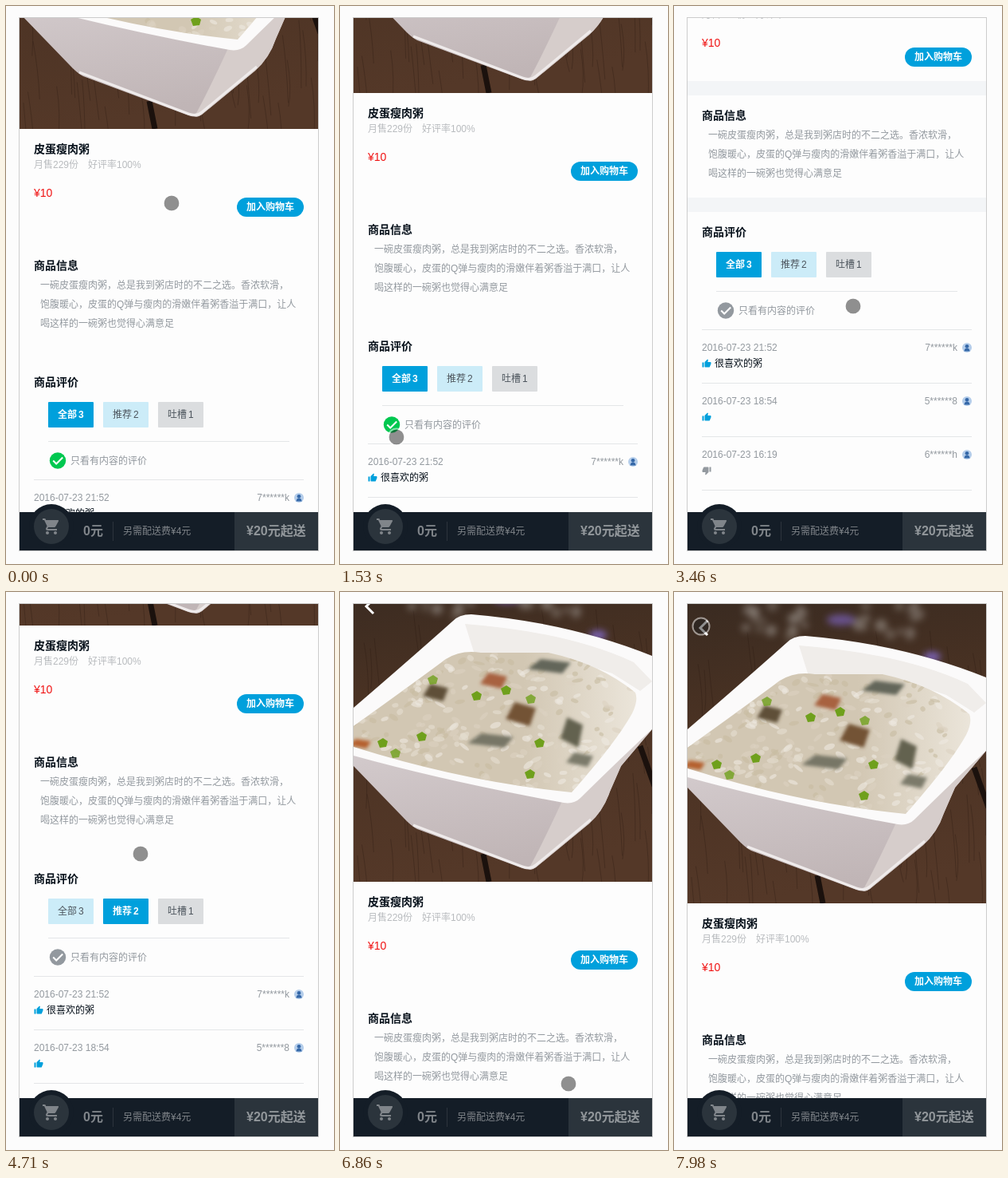
An HTML page for the animation above (8 s loop, 412 by 699 pixels).

```html
<!DOCTYPE html>
<html lang="zh-CN">
<head>
<meta charset="utf-8">
<style>
html, body { margin: 0; width: 100%; height: 100%; overflow: hidden; background: #fcfcfc; }
svg { display: block; font-family: "Liberation Sans", "Noto Sans CJK SC", sans-serif; }
</style>
</head>
<body>
<svg id="stage" width="412" height="699" viewBox="0 0 412 699">
  <defs>
    <clipPath id="screen"><rect x="17" y="15" width="375" height="667"/></clipPath>
    <clipPath id="square"><rect width="375" height="375"/></clipPath>
    <clipPath id="soupEdge"><path id="soupShape" d="M0 180Q70 130 116 96Q135 84 160 88L245 88Q310 102 354 138Q358 148 350 164Q330 200 274 263Q140 250 0 206Z"/></clipPath>
    <linearGradient id="wood" x2=".15" y2="1">
      <stop offset="0" stop-color="#3a2b21"/><stop offset=".4" stop-color="#4a3223"/>
      <stop offset="1" stop-color="#543828"/>
    </linearGradient>
    <linearGradient id="side" x2=".3" y2="1">
      <stop offset="0" stop-color="#d6ced0"/><stop offset="1" stop-color="#c0b5b6"/>
    </linearGradient>
    <linearGradient id="soup">
      <stop offset=".6" stop-color="#d2c7b3"/><stop offset="1" stop-color="#ebe5da"/>
    </linearGradient>
    <filter id="blur"><feGaussianBlur stdDeviation="4"/></filter>
    <filter id="soft"><feGaussianBlur stdDeviation="2"/></filter>
    <path id="thumb" d="M1 21h4V9H1v12zm22-11c0-1.1-.9-2-2-2h-6.31l.95-4.57.03-.32c0-.41-.17-.79-.44-1.06L14.17 1 7.59 7.59C7.22 7.95 7 8.45 7 9v10c0 1.1.9 2 2 2h9c.83 0 1.54-.5 1.84-1.22l3.02-7.05c.09-.23.14-.47.14-.73v-2z"/>
  </defs>
  <rect x="16.5" y="14.5" width="376" height="668" fill="#fdfdfd" stroke="#ccc"/>
  <g clip-path="url(#screen)">
    <g id="page">
      <g transform="translate(17 15)" clip-path="url(#square)">
        <rect width="375" height="375" fill="url(#wood)"/>
        <g id="grain" stroke="#2c1b12" stroke-opacity=".35" fill="none"/>
        <path d="M163 340L170 375M360 205L378 255" stroke="#1b110d" stroke-width="7"/>
        <g filter="url(#blur)">
          <g id="flowers" fill="#8a8078"/>
          <ellipse cx="193" cy="20" rx="18" ry="7" fill="#67518c"/>
          <ellipse cx="307" cy="66" rx="11" ry="6" fill="#7a62b4"/>
        </g>
        <path d="M0 212L270 272L375 184L336 230L322 262Q314 286 296 302L229 357Q223 362 212 358L80 309Q72 305 62 294L0 230Z" fill="url(#side)"/>
        <path d="M262 274L375 184L336 230L322 262Q314 286 296 302L229 357Q223 361 220 359Q236 330 262 274Z" fill="#d6cdcb"/>
        <path d="M75 304L212 356Q222 360 229 354L298 297" fill="none" stroke="#efebeb" stroke-width="3"/>
        <path d="M0 157Q70 97 124 49Q132 40 148 40Q270 50 375 92V184Q340 216 285 270Q277 278 264 276Q120 250 0 217Z" fill="#fbfafa"/>
        <path d="M140 52L152 90L245 88L325 114L360 136L375 124L352 100Q270 62 140 52Z" fill="#f0edea"/>
        <use href="#soupShape" fill="url(#soup)"/>
        <g clip-path="url(#soupEdge)">
          <g id="rice"/>
          <g id="pieces" filter="url(#soft)"/>
        </g>
        <g id="onions" fill="#6fa01c"/>
        <path d="M25 21L16 30L25 39" fill="none" stroke="#fff" stroke-width="3"/>
      </g>
      <g id="content"></g>
    </g>
    <rect x="17" y="634" width="375" height="48" fill="#141d27"/>
    <rect x="287" y="634" width="105" height="48" fill="#2b343c"/>
    <circle cx="57" cy="652" r="28" fill="#141d27"/>
    <circle cx="57" cy="652" r="22" fill="#2b343c"/>
    <path transform="translate(45 640)" fill="#80858a" d="M7 18c-1.1 0-2 .9-2 2s.9 2 2 2 2-.9 2-2-.9-2-2-2zM1 2v2h2l3.6 7.59-1.35 2.45c-.16.28-.25.61-.25.96 0 1.1.9 2 2 2h12v-2H7.42c-.14 0-.25-.11-.25-.25l.03-.12.9-1.63h7.45c.75 0 1.41-.41 1.75-1.03l3.58-6.49A1 1 0 0020 4H5.21l-.94-2H1zm16 16c-1.1 0-2 .9-2 2s.9 2 2 2 2-.9 2-2-.9-2-2-2z"/>
    <path d="M134.5 646v24" stroke="#2c343d"/>
    <g id="footer"></g>
  </g>
  <g id="touch">
    <circle r="9.5" fill="#222" fill-opacity=".5"/>
    <circle r="10.5" fill="none" stroke="#fff" stroke-opacity=".5" stroke-width="2"/>
  </g>
</svg>
<script>
const LOOP = 8000, BLUE = '#00a0dc', GREY = '#93999f', DARK = '#07111b', SLATE = '#4d555d';
const $ = id => document.getElementById(id);

const text = (x, mid, str, fill = GREY, size = 12, attrs = '') =>
  `<text x="${x}" y="${mid + size * .37}" font-size="${size}" fill="${fill}" ${attrs}>${str}</text>`;
const bold = (x, mid, str, fill, size) => text(x, mid, str, fill, size, 'font-weight="700"');
const rect = (x, y, w, h, fill, attrs = '') =>
  `<rect x="${x}" y="${y}" width="${w}" height="${h}" fill="${fill}" ${attrs}/>`;
const rule = (x, y, w) => rect(x, y, w, 1, '#e4e6e8');

// Photo details
let seed = 11;
const random = () => (seed = seed * 16807 % 2147483647) / 2147483647;
const repeat = (n, make) => Array.from({ length: n }, make).join('');
$('grain').innerHTML = repeat(110, () => {
  const x = random() * 420 - 30, y = random() * 320 + 30;
  return `<path d="M${x} ${y}q${3 + random() * 4} 35 ${random() * 10} ${50 + random() * 40}"/>`;
});
$('flowers').innerHTML = repeat(36, (_, i) =>
  `<circle cx="${(i % 2 ? 70 : 205) + random() * 90}" cy="${random() * 42}" r="${3 + random() * 5}" opacity="${.3 + random() * .5}"/>`);
$('rice').innerHTML = repeat(300, () => {
  const x = random() * 355, y = 88 + random() * 178, tone = ['#e6dfd2', '#ddd3c2', '#c9bca2', '#efeae2'][random() * 4 | 0];
  return `<ellipse cx="${x}" cy="${y}" rx="${3 + random() * 5}" ry="${2 + random() * 2}" fill="${tone}" opacity=".6" transform="rotate(${random() * 90 - 45} ${x} ${y})"/>`;
});
$('pieces').innerHTML = [
  [103, 138, 16, 11, '#5f5039'], [246, 105, 27, 9, '#63665a'], [210, 165, 19, 15, '#735335'],
  [274, 188, 14, 19, '#63624f'], [172, 198, 29, 9, '#777666'], [284, 222, 17, 9, '#7b7a6a'],
  [176, 123, 17, 10, '#a8623f'], [8, 202, 14, 6, '#b5602f']
].map(([x, y, w, h, fill]) =>
  `<path d="M${x - w} ${y + h * .4}L${x - w * .4} ${y - h}L${x + w} ${y - h * .5}L${x + w * .6} ${y + h}Z" fill="${fill}"/>`).join('');
$('onions').innerHTML = [[99, 122], [154, 142], [191, 135], [222, 146], [85, 193], [36, 201], [52, 214], [233, 201], [221, 240]]
  .map(([x, y], i) => `<path d="M${x - 6} ${y - 2}l7 -4l6 4l-2 7l-8 1z" opacity="${i % 3 ? 1 : .8}"/>`).join('');

// Page below the photo
const tab = (x, label, count, back) => `<g class="tab" data-back="${back}">` +
  rect(x, 732, 57, 32, back, 'rx="1"') + text(x + 12, 748, label, SLATE) + text(x + 38, 748, count, SLATE) + '</g>';

const review = (y, date, user, liked, words = '') => '<g class="review">' +
  text(35, y, date) + text(356, y, user, GREY, 12, 'text-anchor="end"') +
  `<g transform="translate(368 ${y})"><circle r="6" fill="#b4cdea"/><circle cy="-1.8" r="2.3" fill="#3568a8"/><path d="M-3.5 4.5Q-3 .5 0 .5T3.5 4.5Z" fill="#3568a8"/></g>` +
  `<use href="#thumb" fill="${liked ? BLUE : GREY}" transform="translate(41 ${y + 20}) scale(${liked ? .5 : -.5}) translate(-12 -12)"/>` +
  text(51, y + 20, words, DARK) + rule(35, y + 44, 339) + '</g>';

$('content').innerHTML =
  `<g id="gaps">${[518, 664].map(y => rect(17, y, 375, 18, '#f3f5f7')).join('')}</g>` +
  bold(35, 415, '皮蛋瘦肉粥', DARK, 14) +
  text(35, 435, '月售229份', '#b9bcbf') + text(103, 435, '好评率100%', '#b9bcbf') +
  text(35, 470, '¥10', '#f01414', 14) +
  rect(290, 476, 84, 24, BLUE, 'rx="12"') + bold(302, 488, '加入购物车', '#fff') +
  bold(35, 561, '商品信息', DARK, 14) +
  ['一碗皮蛋瘦肉粥，总是我到粥店时的不二之选。香浓软滑，',
   '饱腹暖心，皮蛋的Q弹与瘦肉的滑嫩伴着粥香溢于满口，让人',
   '喝这样的一碗粥也觉得心满意足'].map((line, i) => text(43, 586 + i * 24, line)).join('') +
  bold(35, 707, '商品评价', DARK, 14) +
  tab(53, '全部', 3, '#ccecf8') + tab(122, '推荐', 2, '#ccecf8') + tab(191, '吐槽', 1, '#dbdddf') +
  rule(53, 781, 303) +
  '<circle id="check" cx="65" cy="805.5" r="10.2"/><path d="M59.2 805.5l4 4l8 -8" fill="none" stroke="#fff" stroke-width="2"/>' +
  text(81, 805.5, '只看有内容的评价') + rule(35, 829, 339) +
  review(852, '2016-07-23 21:52', '7******k', true, '很喜欢的粥') +
  review(919, '2016-07-23 18:54', '5******8', true) +
  review(986, '2016-07-23 16:19', '6******h', false);

$('footer').innerHTML = bold(97, 657, '0元', '#80858a', 16) +
  text(147, 657.5, '另需配送费¥4元', '#80858a') + bold(302, 657, '¥20元起送', '#92979b', 16);

// Smooth monotone curve through [time, value...] keys
function track(keys, t, c = 1) {
  let i = 0;
  while (i < keys.length - 2 && t >= keys[i + 1][0]) i++;
  const slope = k => keys[k] && keys[k + 1] ? (keys[k + 1][c] - keys[k][c]) / (keys[k + 1][0] - keys[k][0]) : 0;
  const tangent = k => {
    const a = slope(k - 1), b = slope(k);
    return a * b > 0 ? 2 * a * b / (a + b) : 0;
  };
  const [a, b] = [keys[i], keys[i + 1]], span = b[0] - a[0];
  const u = Math.min(1, (t - a[0]) / span), v = 1 - u;
  return a[c] * v * v * (1 + 2 * u) + b[c] * u * u * (3 - 2 * u) +
    span * u * v * (tangent(i) * v - tangent(i + 1) * u);
}

const FILTER_OFF = 2070, TAB_CHANGE = 4710;
const scrollKeys = [[0, 236], [100, 236], [1090, 290], [1200, 290], [1450, 281], [2700, 281], [3460, 424], [3700, 424],
  [4250, 415], [TAB_CHANGE - .1, 415], [TAB_CHANGE, 348], [5650, 348], [6860, 27], [7180, -30], [7460, -18], [7850, 0], [LOOP, 0]];
const touchKeys = [[0, 208, 247], [100, 208, 247], [1090, 205, 175], [1200, 205, 175], [1530, 71, 540], [1800, 65, 524],
  [FILTER_OFF, 65, 524], [2490, 225, 540], [2700, 225, 540], [3460, 225, 376], [3700, 225, 376], [4430, 169, 328],
  [TAB_CHANGE, 169, 328], [5440, 262, 295], [5650, 262, 295], [6860, 287, 616], [6960, 287, 620], [7460, 61, 109],
  [7850, 34, 43], [LOOP, 34, 43]];

const tabs = document.querySelectorAll('.tab'), reviews = document.querySelectorAll('.review');

function draw(t) {
  const scroll = Math.round(track(scrollKeys, t));
  $('page').setAttribute('transform', `translate(0 ${-scroll})`);
  $('touch').setAttribute('transform', `translate(${track(touchKeys, t)} ${track(touchKeys, t, 2)})`);
  $('gaps').style.display = scroll > 350 ? '' : 'none';
  $('check').setAttribute('fill', t < FILTER_OFF ? '#00c850' : GREY);

  const active = t < TAB_CHANGE ? 0 : 1;
  tabs.forEach((el, i) => {
    const on = i === active;
    el.firstChild.setAttribute('fill', on ? BLUE : el.dataset.back);
    el.querySelectorAll('text').forEach(label => {
      label.setAttribute('fill', on ? '#fff' : SLATE);
      label.setAttribute('font-weight', on ? 700 : 400);
    });
  });
  const shown = t < FILTER_OFF ? 1 : t < TAB_CHANGE ? 3 : 2;
  reviews.forEach((el, i) => el.style.display = i < shown ? '' : 'none');
}

const start = performance.now();
function tick() {
  draw((performance.now() - start) % LOOP);
  requestAnimationFrame(tick);
}
tick();
</script>
</body>
</html>
```
